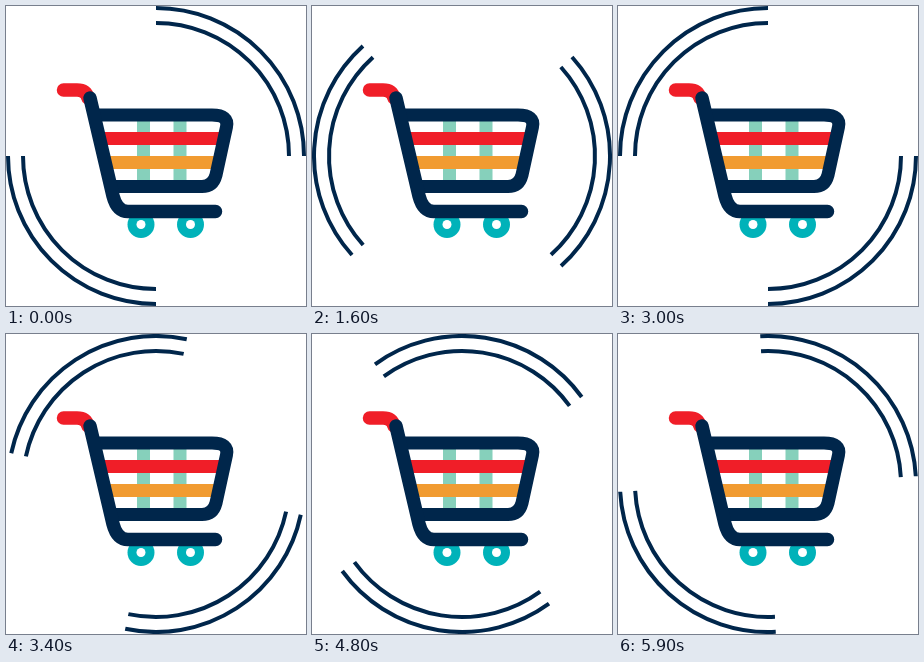
Recreate the animation shown at these times as an HTML page with a canvas. Size 300 by 300 pixels, loop 6 s.

```html
<!DOCTYPE html>
<html lang="en">
<head>
<meta charset="utf-8">
<title>Shopping cart loader</title>
<style>
  html, body { margin: 0; width: 100%; height: 100%; overflow: hidden; background: #fff; }
  canvas { display: block; width: 300px; height: 300px; }
</style>
</head>
<body>
<canvas id="stage"></canvas>
<script>
const SIZE = 300, CENTER = SIZE / 2;
const LOOP = 6000, STEP = 100;
const NAVY = '#00264b', RED = '#f01e28', ORANGE = '#f19b31', GREEN = '#86d0bb', TEAL = '#00b2b9';

const canvas = document.getElementById('stage');
const ctx = canvas.getContext('2d');
const ratio = window.devicePixelRatio || 1;
canvas.width = canvas.height = SIZE * ratio;
ctx.scale(ratio, ratio);

function stroke(path, color, width, cap = 'butt') {
  ctx.strokeStyle = color;
  ctx.lineWidth = width;
  ctx.lineCap = cap;
  ctx.lineJoin = 'round';
  ctx.stroke(new Path2D(path));
}

function disc(x, y, radius, color) {
  ctx.fillStyle = color;
  ctx.beginPath();
  ctx.arc(x, y, radius, 0, Math.PI * 2);
  ctx.fill();
}

function drawWheel(x, y) {
  disc(x, y, 13.5, TEAL);
  disc(x, y, 4.5, '#fff');
}

function drawCart() {
  drawWheel(135, 218.5);
  drawWheel(184.5, 218.5);
  stroke('M137.5 109V180M174 109V180', GREEN, 13);
  stroke('M93 132.5H217', RED, 13);
  stroke('M99 156.5H211', ORANGE, 13);
  stroke('M57.5 84H71Q80 84 82 92', RED, 13.5, 'round');
  stroke('M88 109H206Q223 109 220.5 121L210 169Q207 180.5 196 180.5H105', NAVY, 13);
  stroke('M84 92L107 190Q111 205.5 122 205.5H209.5', NAVY, 13.5, 'round');
}

// Two opposite quarter rings, each a pair of thin lines.
function drawRings(angle) {
  ctx.strokeStyle = NAVY;
  ctx.lineWidth = 4;
  ctx.lineCap = 'butt';
  for (const start of [angle - Math.PI / 2, angle + Math.PI / 2]) {
    for (const radius of [148, 133]) {
      ctx.beginPath();
      ctx.arc(CENTER, CENTER, radius, start, start + Math.PI / 2);
      ctx.stroke();
    }
  }
}

function render() {
  const time = Math.floor((performance.now() % LOOP) / STEP) * STEP;
  ctx.fillStyle = '#fff';
  ctx.fillRect(0, 0, SIZE, SIZE);
  drawRings(time / LOOP * Math.PI);
  drawCart();
  requestAnimationFrame(render);
}
render();
</script>
</body>
</html>
```
